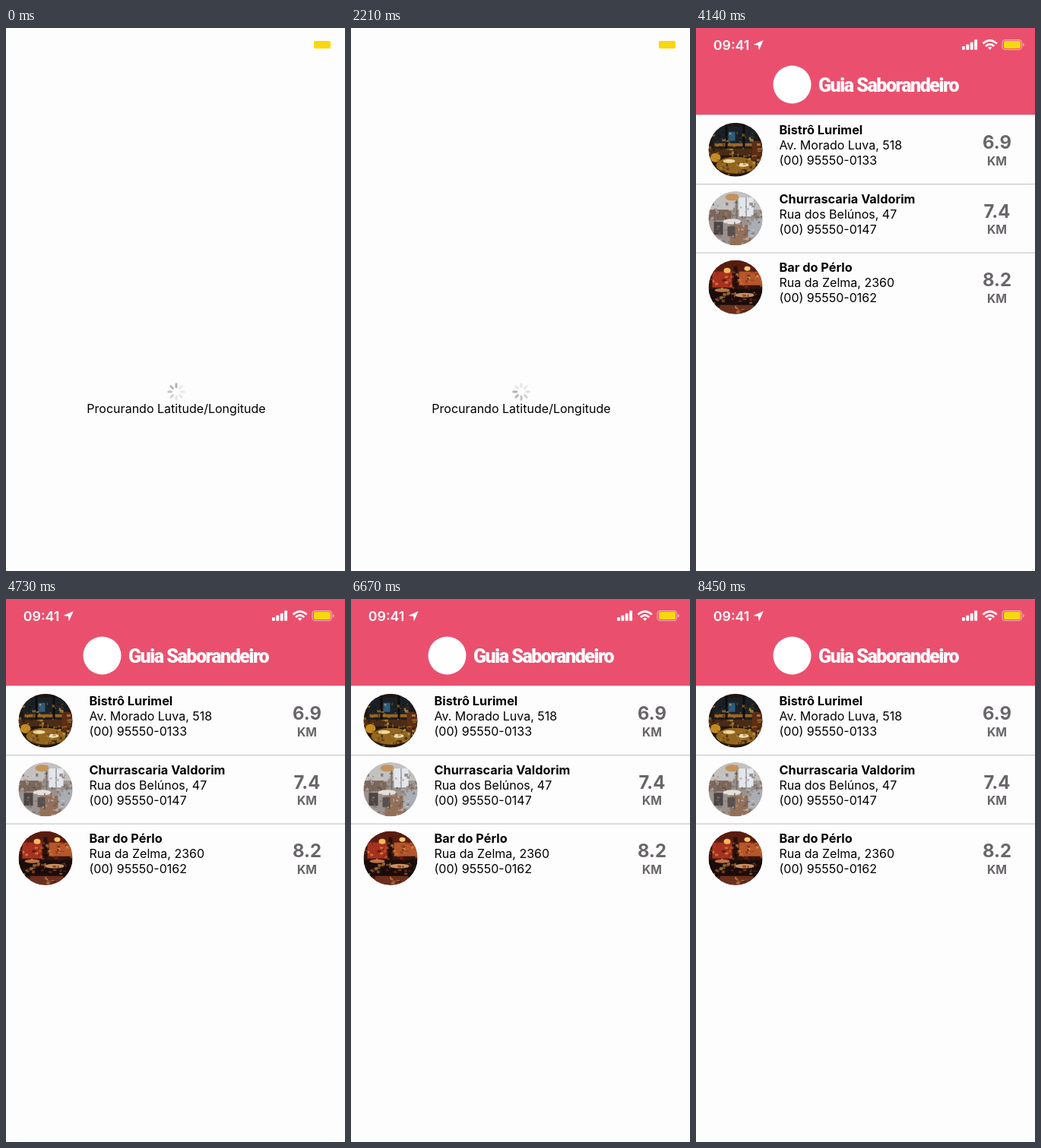
An HTML page for the animation above (8.55 s loop, 446 by 715 pixels).

```html
<!DOCTYPE html>
<html lang="pt-BR">
<head>
<meta charset="utf-8">
<title>Restaurantes</title>
<style>
html, body { margin: 0; width: 100%; height: 100%; overflow: hidden; background: #fdfdfd; }
svg { display: block; width: 100vw; height: 100vh; font-family: Inter, Roboto, sans-serif; }
text { white-space: pre; }
.line { font-size: 16px; }
.name { font-size: 16.3px; font-weight: 700; }
.mid { text-anchor: middle; }
.km { font-weight: 700; fill: #69656a; text-anchor: middle; }
.title { font: 900 25px Roboto, sans-serif; letter-spacing: -1.45px; fill: #fff; }
.clock { font-size: 17.8px; font-weight: 600; fill: #fff; }
</style>
</head>
<body>
<svg viewBox="0 0 446 715">
  <defs>
    <clipPath id="disc"><circle cx="35.5" cy="35.5" r="35.5"/></clipPath>
    <filter id="soft"><feGaussianBlur stdDeviation=".7"/></filter>
  </defs>
  <rect width="446" height="715" fill="#fdfdfd"/>
  <g id="header">
    <rect width="446" height="114" fill="#ea506e"/>
    <rect y="114" width="446" height=".6" fill="#c4c0c3"/>
    <text class="clock" x="22.8" y="28.7">09:41</text>
    <path d="M88.7 16 L76.2 21.6 Q75.8 22 76.4 22.2 L82 22.8 L82.5 28.3 Q82.8 29 83.2 28.4 Z" fill="#fff"/>
    <g id="bars" fill="#fff"></g>
    <g fill="none" stroke="#fff" stroke-width="2.7">
      <path d="M377.6 20.6 Q386.7 12.2 395.8 20.6"/>
      <path d="M381.1 24 Q386.7 18.8 392.3 24"/>
      <path d="M384 25.8 Q386.7 23.6 389.4 25.8 L386.7 28.8 Z" fill="#fff" stroke="none"/>
    </g>
    <rect x="403.1" y="15.6" width="25.4" height="12.9" rx="3.6" fill="none" stroke="#fff" stroke-opacity=".55" stroke-width="1.1"/>
    <path d="M430 20 Q431.9 20.4 431.9 22 Q431.9 23.7 430 24.2 Z" fill="#fff" fill-opacity=".6"/>
  </g>
  <rect x="405" y="17" width="22" height="10" rx="2" fill="#f8d80c"/>
  <text id="wait" class="mid" x="224" y="507" font-size="16.05">Procurando Latitude/Longitude</text>
  <g id="spinner" stroke-width="3" stroke-linecap="round"></g>
  <g id="list">
    <circle cx="126.5" cy="74.5" r="25" fill="#fff"/>
    <text class="title" x="161" y="83.8">Guia Saborandeiro</text>
  </g>
</svg>
<script>
const LOOP = 8550, TICK = 147.5, HEADER_AT = 2800, LIST_AT = 4130;
const $ = id => document.getElementById(id);

function add(parent, tag, attrs, text) {
  const el = document.createElementNS('http://www.w3.org/2000/svg', tag);
  for (const key in attrs) el.setAttribute(key, attrs[key]);
  if (text) el.textContent = text;
  parent.append(el);
  return el;
}

function random(seed) {
  return () => (seed = seed * 16807 % 2147483647) / 2147483647;
}

// Shapes: [kind, colour, x, y, width, height]
const rows = [
  {
    text: ['Bistrô Lurimel', 'Av. Morado Luva, 518', '(00) 95550-0133'], km: '6.9',
    base: '#21160f', specks: ['#b9832b', '#4b2c16', '#120d0b', '#e3b85c'],
    shapes: [
      ['r', '#1a2126', 6, 5, 58, 28], ['r', '#9c6524', 8, 27, 50, 4],
      ['r', '#2f5b7d', 26, 12, 9, 12], ['r', '#0f0c0b', 22, 0, 3, 34],
      ['r', '#0f0c0b', 45, 0, 3, 34], ['r', '#4a2b16', 0, 34, 71, 9],
      ['e', '#c48a22', 2, 40, 14, 12], ['e', '#94651d', 10, 45, 52, 22],
      ['e', '#ecd9a0', 19, 48, 16, 5], ['e', '#f2e2b4', 37, 53, 16, 5],
      ['r', '#5e2d14', 57, 24, 14, 26]
    ]
  },
  {
    text: ['Churrascaria Valdorim', 'Rua dos Belúnos, 47', '(00) 95550-0147'], km: '7.4',
    base: '#9c928d', specks: ['#cfcac7', '#6a605c', '#96785f', '#4f494b'],
    shapes: [
      ['r', '#c3c0c0', 0, 0, 71, 24], ['r', '#77716f', 36, 4, 2, 32],
      ['r', '#e3e7ec', 40, 8, 19, 25], ['r', '#777475', 49, 8, 1, 25],
      ['e', '#c2935a', 22, 3, 18, 9], ['r', '#7d675b', 0, 24, 30, 14],
      ['r', '#94705a', 28, 44, 28, 27], ['e', '#e4dfdc', 19, 36, 24, 7],
      ['r', '#4a4446', 7, 40, 12, 17], ['r', '#57504f', 25, 46, 10, 13],
      ['r', '#a9adb5', 52, 36, 19, 25]
    ]
  },
  {
    text: ['Bar do Pérlo', 'Rua da Zelma, 2360', '(00) 95550-0162'], km: '8.2',
    base: '#34140e', specks: ['#c9692b', '#8e2718', '#180c0a', '#e0a85c'],
    shapes: [
      ['r', '#5b1c10', 0, 0, 71, 16], ['r', '#a8301f', 5, 15, 26, 21],
      ['r', '#b5572a', 40, 15, 31, 18], ['r', '#24100c', 33, 8, 5, 34],
      ['e', '#f0b959', 20, 10, 9, 7], ['e', '#f4cb78', 47, 8, 8, 6],
      ['r', '#190d0b', 0, 38, 71, 22], ['e', '#bd7443', 8, 37, 20, 5],
      ['e', '#c7925f', 35, 43, 25, 6], ['r', '#6b2f1d', 14, 59, 45, 12]
    ]
  }
];

function drawPhoto(parent, row, seed) {
  const g = add(parent, 'g', { 'clip-path': 'url(#disc)' });
  add(g, 'rect', { width: 71, height: 71, fill: row.base });
  const scene = add(g, 'g', { filter: 'url(#soft)' });
  for (const [kind, fill, x, y, w, h] of row.shapes) {
    if (kind === 'r') add(scene, 'rect', { x, y, width: w, height: h, fill });
    else add(scene, 'ellipse', { cx: x + w / 2, cy: y + h / 2, rx: w / 2, ry: h / 2, fill });
  }
  const rnd = random(seed);
  for (let i = 0; i < 110; i++) {
    add(scene, 'rect', {
      x: rnd() * 70, y: 12 + rnd() * 56, width: 1 + rnd() * 4, height: 1 + rnd() * 3,
      fill: row.specks[i % 4], opacity: .55
    });
  }
}

rows.forEach((row, i) => {
  const g = add($('list'), 'g', { transform: `translate(0 ${114 + i * 90.5})` });
  drawPhoto(add(g, 'g', { transform: 'translate(16.5 10.7)' }), row, 71 + i * 30);
  row.text.forEach((s, n) => add(g, 'text', { class: n ? 'line' : 'name', x: 109.5, y: 26.4 + n * 20 }, s));
  add(g, 'text', { class: 'km', x: 396, y: 45, 'font-size': 23.9 }, row.km);
  add(g, 'text', { class: 'km', x: 396, y: 66.5, 'font-size': 15.8 }, 'KM');
  if (i < 2) add(g, 'rect', { y: 91, width: 446, height: 1.2, fill: '#c8c7cc' });
});

[4.8, 7.2, 10, 13.6].forEach((height, i) =>
  add($('bars'), 'rect', { x: 350 + i * 5.4, y: 28.8 - height, width: 3.9, height, rx: 1 }));

const greys = [176, 184, 196, 210, 228, 232, 232, 232];
const spokes = greys.map((_, i) =>
  add($('spinner'), 'line', { y1: -6.3, y2: -10.2, transform: `rotate(${i * 45})` }));

const show = (id, on) => $(id).style.display = on ? '' : 'none';

function render(time) {
  const t = Math.floor((time % LOOP + 10) / TICK) * TICK;
  const loading = t >= HEADER_AT - 10, done = t >= LIST_AT - 10;
  show('header', loading);
  show('wait', !loading);
  show('list', done);
  show('spinner', !done);
  $('spinner').setAttribute('transform', `translate(224 ${loading ? 126 : 479})`);
  const lead = Math.floor(t / 100) + (loading ? 7 : 0);
  spokes.forEach((spoke, i) => {
    const v = greys[(lead - i + 8) % 8];
    spoke.setAttribute('stroke', `rgb(${v},${v},${v})`);
  });
}

const start = performance.now();
function frame() {
  render(performance.now() - start);
  requestAnimationFrame(frame);
}
frame();
</script>
</body>
</html>
```
